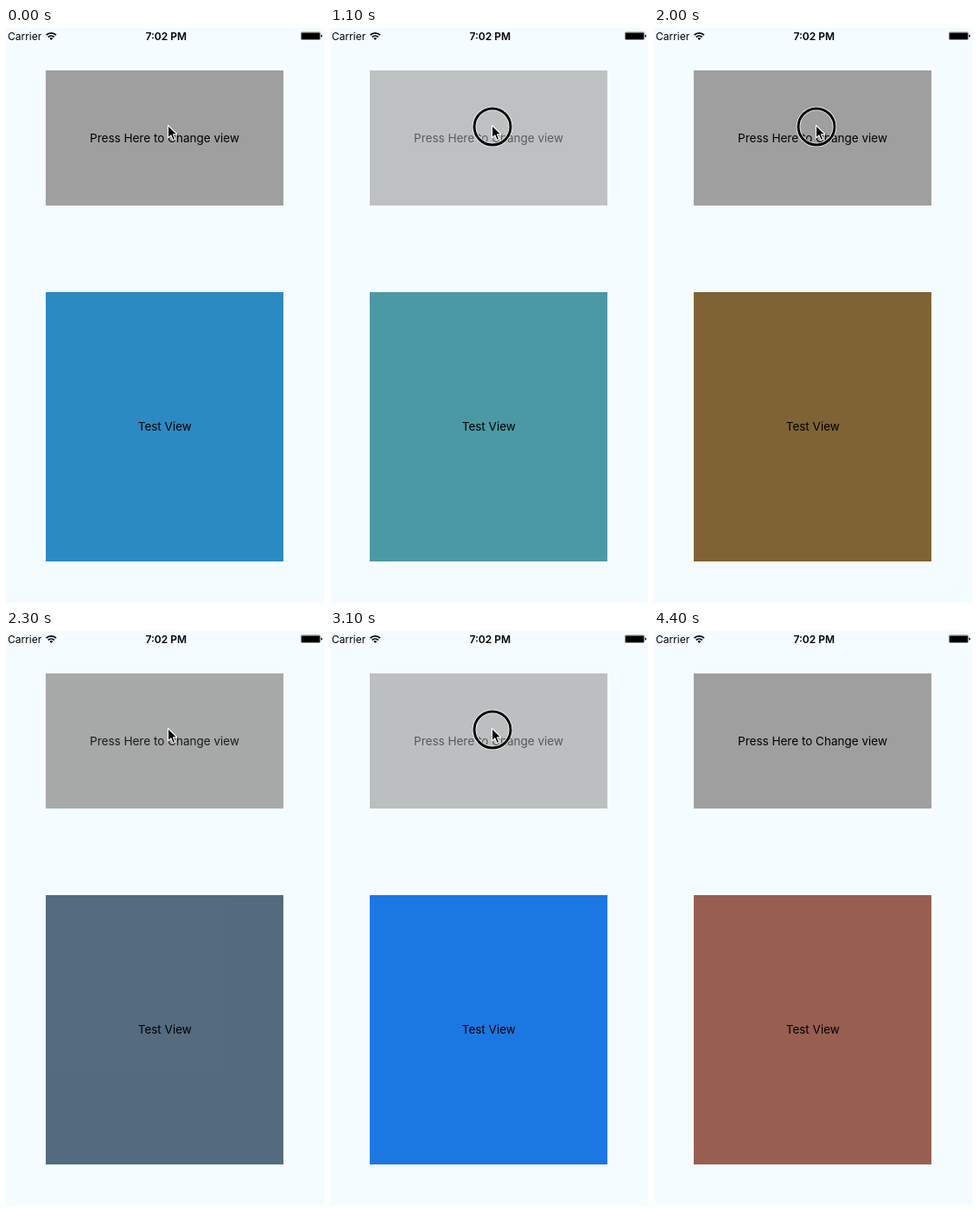
Animation, 368 px wide and 664 px high, one loop 4700 ms. Source, as an HTML page:

```html
<!DOCTYPE html>
<html lang="en">
<head>
<meta charset="utf-8">
<title>View transitions</title>
<style>
  html, body { margin: 0; width: 100%; height: 100%; overflow: hidden; background: #f5fcff; }
  svg { display: block; width: 100%; height: 100%; }
  text { font-family: Inter, Roboto, sans-serif; font-size: 13.5px; fill: #000; }
  .mid { text-anchor: middle; }
  .bar text { font-size: 12px; }
</style>
</head>
<body>
<svg viewBox="0 0 368 664">
  <rect width="368" height="664" fill="#f5fcff"/>

  <g class="bar">
    <text x="2" y="14">Carrier</text>
    <g fill="none" stroke="#000" stroke-width="1.8">
      <path d="M46.6 8.2a8 8 0 0 1 11.4 0"/>
      <path d="M48.8 10.5a5 5 0 0 1 7 0"/>
    </g>
    <path d="M50.4 11.9a2.7 2.7 0 0 1 3.8 0l-1.9 2z"/>
    <text class="mid" x="185.2" y="14" font-weight="600">7:02 PM</text>
    <rect x="341.4" y="4.9" width="22.2" height="8.6" rx="1" fill="none" stroke="#777" stroke-width=".8"/>
    <rect x="342" y="5.5" width="21" height="7.4" rx=".5"/>
    <path d="M364.5 7.6q1.5 .4 1.5 1.6t-1.5 1.6z"/>
  </g>

  <g id="button">
    <rect x="46" y="49" width="275" height="156" fill="#9f9f9f"/>
    <text class="mid" x="183.5" y="132">Press Here to Change view</text>
  </g>

  <g id="below">
    <rect x="46" y="305" width="275" height="311"/>
    <text class="mid" x="183.8" y="465">Test View</text>
  </g>
  <g id="above">
    <rect x="46" y="305" width="275" height="311"/>
    <text class="mid" x="183.8" y="465">Test View</text>
  </g>

  <g id="ring" fill="none">
    <circle cx="188" cy="114" r="21" stroke="#fff" stroke-width="4.6"/>
    <circle cx="188" cy="114" r="21" stroke="#000" stroke-width="3"/>
  </g>
  <path id="cursor" d="M187.5 112.5V127l3.4-3.2 2.4 5.8 2.5-1.1-2.4-5.6h4.7z"
        stroke="#fff" stroke-width="1.1" stroke-linejoin="round"/>
</svg>

<script>
const LOOP = 4700, STEP = 100, SLIDE = 275, FADE = 500, PRESS = 150;
const CURSOR_END = 3800;
const FIRST = '#2c8ac3';

// down/up: pointer; dim/lift: button highlight; up also starts the transition
const taps = [
  { down: 150,  up: 350,  dim: 230,  lift: 360,  color: '#4b99a5', type: 'right' },
  { down: 920,  up: 1226, dim: 1028, lift: 1230, color: '#806335', type: 'left' },
  { down: 1960, up: 2068, dim: 2030, lift: 2188, color: '#1b77e2', type: 'fade' },
  { down: 2990, up: 3115, dim: 3030, lift: 3188, color: '#975e51', type: 'spring' }
];

const el = id => document.getElementById(id);
const button = el('button'), below = el('below'), above = el('above');
const ring = el('ring'), cursor = el('cursor');

const clamp = x => Math.min(1, Math.max(0, x));
const ease = x => {
  x = clamp(x);
  return x < .5 ? 2 * x * x : 1 - 2 * (1 - x) ** 2;
};

function spring(s) {
  const w = 17, damp = 9.2;
  return 1 - Math.exp(-damp * s) * (Math.cos(w * s) + damp / w * Math.sin(w * s));
}

function dimming(t, { dim, lift }) {
  const reached = ease((Math.min(t, lift) - dim) / PRESS);
  return .8 * reached * (1 - ease((t - lift) / PRESS));
}

function transition(type, age) {
  const p = ease(age / FADE);
  if (type === 'spring') {
    const s = spring(age / 1000);
    return { opacity: clamp(s), move: `translate(183.5 460.5) scale(${s}) translate(-183.5 -460.5)` };
  }
  const side = { left: -1, right: 1, fade: 0 }[type];
  return { opacity: p, move: `translate(${side * SLIDE * (1 - p)} 0)` };
}

function paint(view, color) {
  view.firstElementChild.setAttribute('fill', color);
}

const show = (node, on) => node.setAttribute('visibility', on ? 'visible' : 'hidden');

function draw(t) {
  const done = taps.filter(tap => t >= tap.up);
  const tap = done[done.length - 1];
  paint(below, done.length > 1 ? done[done.length - 2].color : FIRST);
  show(above, tap);
  if (tap) {
    const { opacity, move } = transition(tap.type, t - tap.up);
    paint(above, tap.color);
    above.setAttribute('opacity', opacity);
    above.setAttribute('transform', move);
    // the old view leaves once it is fully covered
    show(below, opacity < 1);
  } else {
    show(below, true);
  }

  button.setAttribute('opacity', 1 - Math.max(...taps.map(p => dimming(t, p))));
  show(ring, taps.some(p => t >= p.down && t < p.up));
  show(cursor, t < CURSOR_END);
}

const start = performance.now();
function frame() {
  const t = (performance.now() - start) % LOOP;
  draw(Math.floor(t / STEP) * STEP);
  requestAnimationFrame(frame);
}
frame();
</script>
</body>
</html>
```
